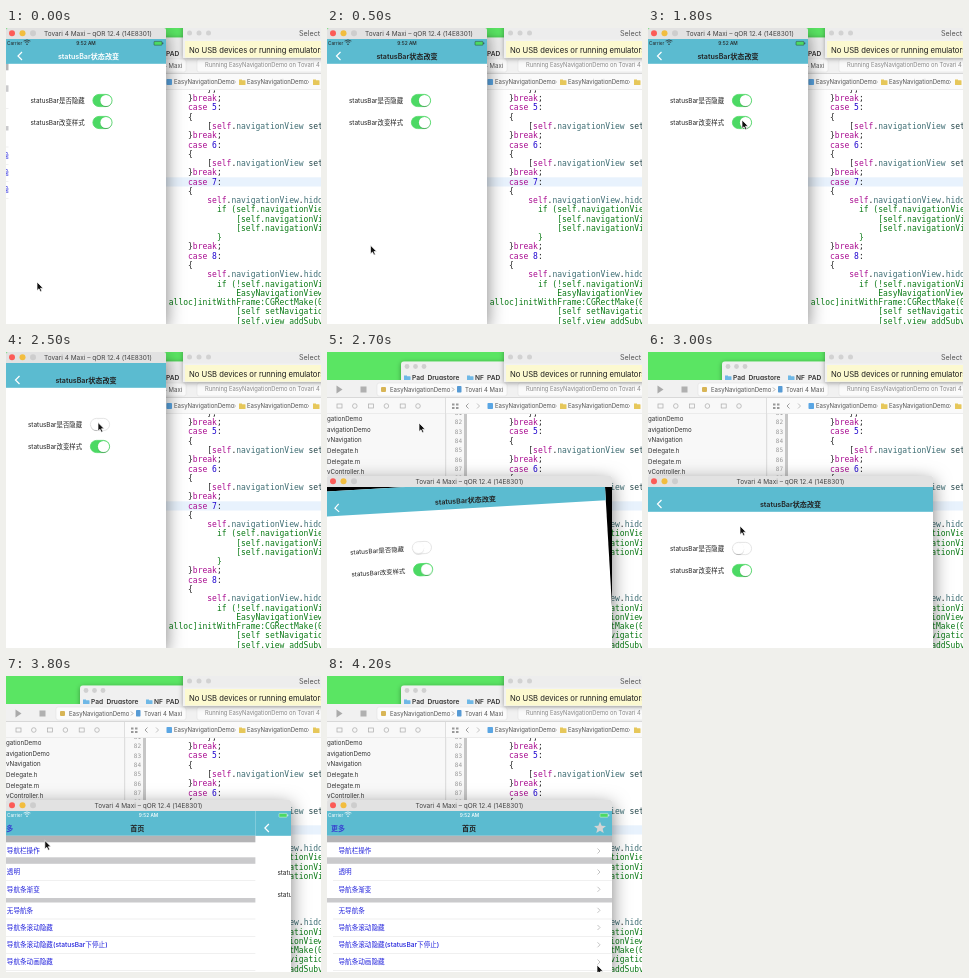
Recreate the animation shown at these times as an HTML page. Size 315 by 296 pixels, loop 4300 ms.

```html
<!DOCTYPE html>
<html lang="zh">
<head>
<meta charset="utf-8">
<style>
html, body { margin: 0; width: 100%; height: 100%; overflow: hidden; background: #fff; }
body > svg { display: block; width: 315px; height: 296px; }
text { font-family: Inter, "Noto Sans CJK SC", "Noto Sans CJK", sans-serif; white-space: pre; }
.code text { font-family: "DejaVu Sans Mono", monospace; font-size: 8px; }
</style>
</head>
<body>
<svg id="stage" viewBox="0 0 315 296" xmlns="http://www.w3.org/2000/svg"></svg>
<script>
const LOOP = 4300, STEP = 100;
const TEAL = '#5bbbd0', GREEN = '#4cd964';
const DEVICE = 'Tovari 4 Maxi', APP = 'EasyNavigationDemo';

const rect = (x, y, w, h, fill, extra = '') =>
  `<rect x="${x}" y="${y}" width="${w}" height="${h}" fill="${fill}" ${extra}/>`;
const text = (x, y, s, size, fill = '#222', extra = '') =>
  `<text x="${x}" y="${y + size * 0.36}" font-size="${size}" fill="${fill}" ${extra}>${s}</text>`;
const dot = (x, y, r, fill) => `<circle cx="${x}" cy="${y}" r="${r}" fill="${fill}"/>`;
const line = (d, color, w = 1) => `<path d="${d}" fill="none" stroke="${color}" stroke-width="${w}"/>`;
const arrow = (x, y, color, r = 2) => line(`M${x} ${y - r}l${r} ${r}l${-r} ${r}`, color, .7);
const folder = (x, y, c) => rect(x, y - 2.5, 3, 2, c) + rect(x, y - 1.8, 6.5, 4.8, c, 'rx=".6"');
const MID = 'text-anchor="middle"', BOLD = 'font-weight="600"';

// Editor lines: column, content, optional comment flag
const K = s => `<tspan fill="#aa0d91">${s}</tspan>`;
const N = s => `<tspan fill="#1c00cf">${s}</tspan>`;
const P = s => `<tspan fill="#3f6e74">${s}</tspan>`;
const nav = K('self') + '.' + P('navigationView');
const caseLine = n => [8, K('case') + ' ' + N(n) + ':'];
const end = [8, '}' + K('break') + ';'], open = [8, '{'];
const setNav = [12, '[' + nav + ' <tspan fill="#26474b">setNavigation</tspan>'];
const hide = [12, nav + '.' + P('hidden')];
const LINES = [
  [12, '};'], end, caseLine(5), open, setNav, end, caseLine(6), open, setNav, end,
  caseLine(7), open, hide,
  [14, 'if (self.navigationView', 1], [18, '[self.navigationView', 1],
  [18, '[self.navigationView', 1], [14, '}', 1], end, caseLine(8), open, hide,
  [14, 'if (!self.navigationView', 1], [18, 'EasyNavigationView', 1],
  [4, 'alloc]initWithFrame:CGRectMake(0', 1],
  [18, '[self setNavigation', 1], [18, '[self.view addSubview', 1]
];

function editor() {
  let s = rect(119, 46, 196, 250, '#fff') + rect(119, 62, 18, 234, '#f8f8f8') +
    rect(137, 62, 3, 234, '#c6c6c6') + rect(140, 149.3, 175, 9.2, '#e8f2fd');
  LINES.forEach(([col, body, note], i) => {
    const y = 61 + i * 9.27;
    s += text(143.5 + col * 4.816, y, body, 8, note ? '#0b7a16' : '#222');
    s += `<text x="135" y="${y + 2.2}" style="font-size:6px" fill="#999" text-anchor="end">${81 + i}</text>`;
  });
  return `<g class="code">${s}</g>`;
}

function desktop() {
  let s = rect(0, 0, 315, 296, '#5ae563');
  s += rect(74, 9.5, 110, 25, '#f0f0f0', 'rx="3" filter="url(#soft)"') +
    [80, 88.5, 97].map(x => dot(x, 14.5, 2.4, '#d0d0d0')).join('') +
    folder(77, 26, '#6fb8e6') + text(85, 26, 'Pad_Drugstore', 6.6, '#333', BOLD) +
    folder(140, 26, '#6fb8e6') + text(148, 26, 'NF_PAD', 6.6, '#333', BOLD);
  s += editor();
  // Toolbar
  s += rect(0, 28, 315, 18, '#f1f1f1') + rect(0, 45.3, 315, .7, '#cfcfcf') +
    '<path d="M9.500 33.500l6 4-6 4z" fill="#aaa"/>' + rect(33.5, 34.5, 6, 6, '#b0b0b0') +
    rect(50, 31, 130, 13, '#fbfbfb', 'rx="2" stroke="#dcdcdc" stroke-width=".5"') +
    rect(54, 35, 5, 5, '#d8b556', 'rx="1"') + text(63, 37.5, APP, 6, '#555') +
    arrow(125, 37.5, '#888') + rect(130, 34, 4.5, 6.5, '#579bd5', 'rx=".7"') +
    text(138, 37.5, DEVICE, 6, '#555') +
    rect(191, 31, 130, 13, '#fafafa', 'rx="2" stroke="#dcdcdc" stroke-width=".5"') +
    text(199, 37.3, `Running ${APP} on ${DEVICE}`, 5.8, '#888');
  // Sidebar
  s += rect(0, 46, 119, 250, '#f8f8f8') + rect(118.5, 46, .6, 250, '#c4c4c4') +
    rect(0, 61.5, 119, .5, '#dcdcdc');
  for (let i = 0; i < 6; i++) {
    const x = 10 + i * 15.8;
    s += i % 2 ? `<circle cx="${x + 2}" cy="54" r="2.3" fill="none" stroke="#aaa" stroke-width=".7"/>`
      : rect(x, 52, 5, 4, 'none', 'stroke="#aaa" stroke-width=".7"');
  }
  ['gationDemo', 'avigationDemo', 'vNavigation', 'Delegate.h', 'Delegate.m', 'vController.h']
    .forEach((name, i) => s += text(0, 67 + i * 10.6, name, 6.2, '#333'));
  // Breadcrumb
  s += rect(119, 46, 196, 16, '#fafafa') + rect(119, 61.5, 196, .5, '#dcdcdc') +
    [[125, 51.5], [129, 51.5], [125, 55], [129, 55]].map(([x, y]) => rect(x, y, 2.5, 2, '#999')).join('') +
    line('M141.500 51.500l-2.500 2.500 2.500 2.500', '#888', .8) + arrow(150, 54, '#aaa', 2.5) +
    rect(160.5, 51, 5.5, 6, '#5aa6e4', 'rx=".8"') + text(168, 54, APP, 6, '#555') +
    arrow(227.5, 54, '#999') + folder(233, 54, '#e6c75a') +
    text(241, 54, APP, 6, '#555') + arrow(301, 54, '#999') + folder(307, 54, '#e6c75a');
  // Dialog
  s += rect(177, -5, 145, 35, '#f2f2f2', 'filter="url(#soft)"') + rect(177, 0, 138, 11.5, '#ededed') +
    [183.5, 193, 202.5].map(x => dot(x, 5, 2.5, '#d2d2d2')).join('') +
    text(293, 5, 'Select', 7.2, '#555') + rect(179, 13, 136, 16.5, '#fcf9d0') +
    text(183, 21.8, 'No USB devices or running emulators', 7.65, '#1c1c1c');
  return s;
}

const toggle = (id, y) => `<g transform="translate(84 ${y})">
  <rect id="${id}Track" x=".4" y=".4" width="19.200" height="12.200" rx="6.100" stroke-width=".8"/>
  <circle id="${id}Knob" cy="6.500" r="5.600" fill="#fff" filter="url(#knob)"/></g>`;

function page() {
  return `<rect id="paper" fill="#fff"/><rect id="bar" height="24.800" fill="${TEAL}"/>` +
    line('M13.500 13l-4 4 4 4', '#fff', 1.2) +
    text(0, 17, 'statusBar状态改变', 7.1, '#222', `id="title" ${BOLD} ${MID}`) +
    text(22, 62, 'statusBar是否隐藏', 6.4) + text(22, 84, 'statusBar改变样式', 6.4) +
    toggle('hid', 55) + toggle('sty', 77);
}

function home() {
  const star = Array.from({ length: 10 }, (_, i) => {
    const r = i % 2 ? 2.8 : 6.3, a = i * Math.PI / 5;
    return `${273 + r * Math.sin(a)},${17 - r * Math.cos(a)}`;
  }).join(' ');
  let s = rect(0, 0, 285, 285, '#fff') + rect(0, 0, 285, 24.8, TEAL) +
    rect(0, 24.8, 285, 6.5, '#b4b4b6') + rect(0, 46.3, 285, 6.5, '#cacacc') + rect(0, 87, 285, 4.5, '#cacacc') +
    text(4, 17, '更多', 7, '#3a45d0', BOLD) + text(142, 17, '首页', 7.1, '#222', `${BOLD} ${MID}`) +
    `<polygon points="${star}" fill="#d4d4d4"/>`;
  const rows = ['导航栏操作', '透明', '导航条渐变', '无导航条', '导航条滚动隐藏',
    '导航条滚动隐藏(statusBar下停止)', '导航条动画隐藏'];
  [40, 61, 78.3, 99.3, 116.5, 133.8, 151].forEach((y, i) => {
    s += text(11.5, y, rows[i], 6.6, '#2222dc', 'font-weight="500"') + arrow(270.5, y, '#aaa', 2.5);
    if (i && i !== 2) s += rect(6, y + 8.5, 279, .4, '#d8d8d8');
  });
  return s;
}

const status = `<g id="status">` + text(1, 4.3, 'Carrier', 4.7, 'currentColor') +
  [3.4, 2.1].map(r => line(`M${21 - r} ${5.5 - r}q${r} ${-r * .7} ${2 * r} 0`, 'currentColor', .7)).join('') +
  '<circle cx="21" cy="5.200" r=".7" fill="currentColor"/>' +
  text(0, 4.3, '9:52 AM', 4.8, 'currentColor', `id="clock" font-weight="500" ${MID}`) +
  `<g id="battery">${rect(0, 2.4, 8, 3.8, GREEN, 'rx=".6" stroke="currentColor" stroke-width=".4"')}${rect(8.5, 3.5, .7, 1.6, 'currentColor')}</g></g>`;

document.getElementById('stage').innerHTML = `<defs>
  <filter id="soft" x="-20%" y="-50%" width="140%" height="200%"><feDropShadow dx="0" dy="1" stdDeviation="2.500" flood-opacity=".35"/></filter>
  <filter id="deep" x="-25%" y="-25%" width="150%" height="150%"><feDropShadow dx="0" dy="5" stdDeviation="9" flood-opacity=".5"/></filter>
  <filter id="knob" x="-30%" y="-30%" width="160%" height="160%"><feDropShadow dx="0" dy=".6" stdDeviation=".5" flood-opacity=".35"/></filter>
</defs>${desktop()}
<g id="sim"><rect id="frame" fill="#e2e2e2" rx="2" filter="url(#deep)"/>
  ${dot(6, 5.3, 3, '#fc5b57')}${dot(16.5, 5.3, 3, '#f2bd3f')}${dot(27, 5.3, 3, '#cdcdcd')}
  ${text(0, 5.6, DEVICE + ' – qOR 12.4 (14E8301)', 6.5, '#444', `id="caption" ${MID}`)}
  <svg id="screen" y="11" overflow="hidden">${rect(0, 0, 315, 296, '#000')}
    <g id="turn"><g id="home">${home()}</g><g id="page">${page()}</g>${status}</g></svg></g>
<path id="cursor" d="M0 0v8.600l2-1.800 1.400 3 1.500-.7-1.400-2.900h2.700z" fill="#111" stroke="#fff" stroke-width=".7"/>`;

const $ = id => document.getElementById(id);
const set = (id, attrs) => { for (const k in attrs) $(id).setAttribute(k, attrs[k]); };
const ramp = (t, a, b) => Math.min(1, Math.max(0, (t - a) / (b - a)));
const ease = p => p * p * (3 - 2 * p);
const easeOut = p => 1 - Math.pow(1 - p, 3);
const mix = (a, b, p) => a + (b - a) * p;
const between = (t, a, b) => t >= a && t < b;

// Pointer stops: time, x, y
const PATH = [[0, 31, 254], [300, 31, 254], [1000, 94, 69], [1500, 94, 69], [1700, 94, 92],
  [2100, 94, 92], [2300, 92, 70], [2700, 92, 71], [3100, 92, 193], [3300, 92, 193],
  [3400, 85, 186], [3600, 12, 150], [3700, 12, 150], [4200, 270, 289]];

function pointer(t) {
  const i = Math.max(1, PATH.findIndex(p => p[0] >= t));
  const [a, x, y] = PATH[i - 1], [b, u, v] = PATH[i], p = ease(ramp(t, a, b));
  return [mix(x, u, p), mix(y, v, p)];
}

function setToggle(id, on) {
  set(id + 'Track', { fill: on ? GREEN : '#fff', stroke: on ? GREEN : '#dedede' });
  set(id + 'Knob', { cx: on ? 13.5 : 6.5 });
}

function draw(t) {
  const wide = t >= 2600, w = wide ? 285 : 160, h = wide ? 161 : 285;
  const shown = !between(t, 1200, 1500) && !between(t, 2400, 3200);
  const dark = !between(t, 1900, 2200);
  const pop = easeOut(ramp(t, 3600, 4000));
  const slide = 2.5 * (1 - ramp(t, 0, 100));

  set('sim', { transform: `translate(0 ${wide ? 124 : 0})` });
  set('frame', { width: w, height: h + 11 });
  set('screen', { width: w, height: h });
  set('caption', { x: wide ? 142.5 : 92 });

  // The page resizes while it turns
  const turn = wide ? easeOut(ramp(t, 2500, 2800)) : 1;
  const pageW = mix(160, w, turn), bleed = 30 * (turn < 1);
  set('turn', { transform: `rotate(${-90 * (1 - turn)} 80 46)` });
  set('paper', { x: -bleed, width: pageW + bleed, height: mix(285, h, turn) + bleed });
  set('bar', { x: -bleed - slide, width: pageW + bleed + slide });
  set('title', { x: pageW / 2, fill: slide ? '#fff' : '#222' });

  const behind = pop > 0 || slide > 0;
  set('page', { transform: `translate(${slide + pop * w} 0)`, visibility: pop < 1 ? 'visible' : 'hidden' });
  set('home', { transform: `translate(${-.3 * w * (1 - pop)} 0)`, visibility: behind ? 'visible' : 'hidden' });

  const light = !dark || t >= 3800;
  set('status', { color: light ? '#fff' : '#222', visibility: shown ? 'visible' : 'hidden' });
  set('clock', { x: w / 2 });
  set('battery', { transform: `translate(${w - 12} 0)` });
  setToggle('hid', shown);
  setToggle('sty', dark);
  set('cursor', { transform: `translate(${pointer(t).join(' ')})` });
}

const start = performance.now();
function tick() {
  const t = (performance.now() - start) % LOOP;
  draw(Math.floor(t / STEP) * STEP);
  requestAnimationFrame(tick);
}
draw(0);
requestAnimationFrame(tick);
</script>
</body>
</html>
```
